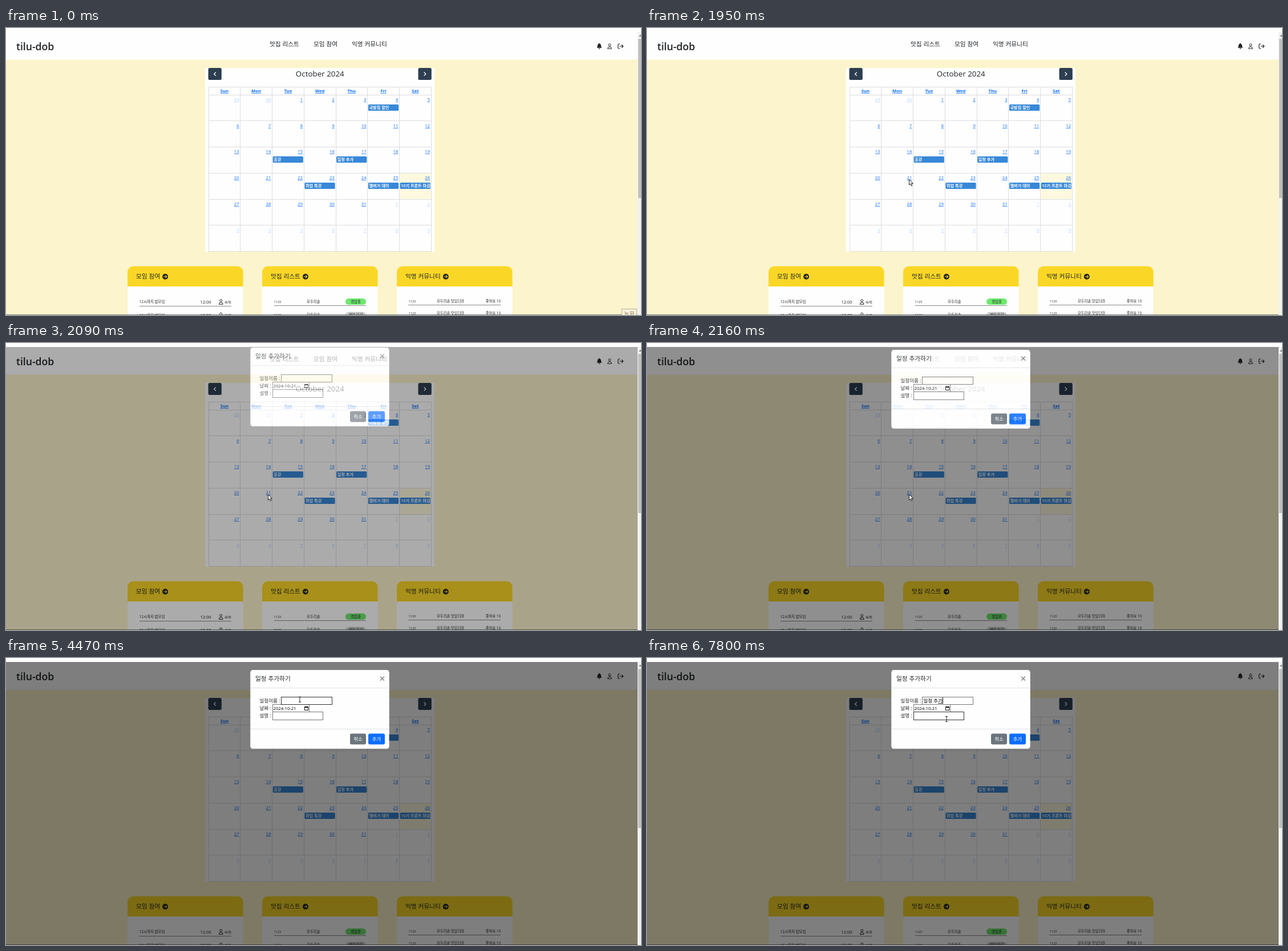
An HTML page with a canvas that plays this animation: 1113 px wide and 503 px high, repeating every 8 s.

```html
<!DOCTYPE html>
<html lang="ko">
<head>
<meta charset="utf-8">
<title>Calendar</title>
<style>
html, body { margin: 0; width: 100%; height: 100%; overflow: hidden; background: #fff; }
canvas { display: block; }
</style>
</head>
<body>
<canvas id="stage" width="1113" height="503"></canvas>
<script>
const W = 1113, H = 503, LOOP = 8000;
const FONT = '"Open Sans", "Noto Sans CJK KR", "Noto Sans CJK JP", sans-serif';
const INK = '#212529', LINK = '#0d6efd', YELLOW = '#fad726';
const stage = document.getElementById('stage').getContext('2d');

function layer(paint) {
  const canvas = document.createElement('canvas');
  canvas.width = W;
  canvas.height = H;
  paint(canvas.getContext('2d'));
  return canvas;
}

function rect(c, x, y, w, h, color, radius = 0) {
  c.fillStyle = color;
  c.beginPath();
  c.roundRect(x, y, w, h, radius);
  c.fill();
}

function stroke(c, path, color, width = 1) {
  c.strokeStyle = color;
  c.lineWidth = width;
  c.stroke(new Path2D(path));
}

// y is the visual middle of the glyphs
function text(c, str, x, y, size, { color = INK, weight = 400, align = 'left', underline = false } = {}) {
  c.font = `${weight} ${size}px ${FONT}`;
  c.fillStyle = color;
  c.textAlign = 'left';
  const w = c.measureText(str).width;
  const left = align === 'center' ? x - w / 2 : align === 'right' ? x - w : x;
  const base = y + size * 0.37;
  c.fillText(str, left, base);
  if (underline) c.fillRect(left, Math.round(base + 1), w, 0.8);
  return left + w;
}

function person(c, x, y) {
  c.strokeStyle = INK;
  c.lineWidth = 1;
  c.beginPath();
  c.arc(x, y - 2.3, 2, 0, Math.PI * 2);
  c.stroke();
  stroke(c, `M${x - 3.5} ${y + 4.3} q0 -3.4 3.5 -3.4 q3.5 0 3.5 3.4 z`, INK);
}

function navbar(c) {
  rect(c, 0, 0, W, 55.5, '#fefefe');
  text(c, 'tilu-dob', 18, 32.5, 17.6, { weight: 600 });
  text(c, '맛집 리스트', 462, 28, 10.7);
  text(c, '모임 참여', 539, 28, 10.7);
  text(c, '익명 커뮤니티', 606, 28, 10.7);
  c.fillStyle = INK;
  c.fill(new Path2D('M1035.5 34.8 q1.3 -1.4 1.3 -4 q0 -2.7 2.5 -3.2 v-1 h1.2 v1 q2.5 .5 2.5 3.2 q0 2.6 1.3 4 z M1038.5 35.5 h3 q-.2 1.4 -1.5 1.4 q-1.3 0 -1.5 -1.4 z'));
  person(c, 1058, 32);
  stroke(c, 'M1076 28 h-2 q-1.2 0 -1.2 1.2 v5.6 q0 1.2 1.2 1.2 h2 M1075.5 32 h6 M1079 29.2 l2.8 2.8 l-2.8 2.8', INK, 1.2);
}

const EVENTS = [[0, 5, '국밥집 할인'], [2, 2, '휴강'], [2, 4, '일정 추가'],
  [3, 3, '취업 특강'], [3, 5, '햄버거 데이'], [3, 6, '10기 프론트 마감']];

function calendar(c) {
  const left = 355, top = 117, cw = 55.75, rh = 45.75;
  const colX = i => Math.round(left - 0.5 + i * cw);
  const rowY = i => Math.round(top - 0.5 + i * rh);
  rect(c, 349, 70, 402, 322, '#fefefe');
  rect(c, 354.5, 70, 23.3, 21, '#2c3e50', 2.5);
  rect(c, 722.5, 70, 23.3, 21, '#2c3e50', 2.5);
  stroke(c, 'M367.8 77.5 l-3.2 3.2 l3.2 3.2 M732.6 77.5 l3.2 3.2 l-3.2 3.2', '#fff', 1.3);
  text(c, 'October 2024', 550.3, 80.5, 13.4, { align: 'center' });

  rect(c, colX(6), rowY(3), cw, rh, 'rgba(255,220,40,.15)');
  for (let i = 0; i <= 7; i++) rect(c, colX(i), 103, 1, 289, '#ddd');
  rect(c, left, 103, 391, 1, '#ddd');
  for (let i = 0; i <= 6; i++) rect(c, left, rowY(i), 391, 1, '#ddd');

  ['Sun', 'Mon', 'Tue', 'Wed', 'Thu', 'Fri', 'Sat'].forEach((d, i) =>
    text(c, d, left + (i + 0.5) * cw, 110, 7.7, { color: LINK, weight: 700, align: 'center', underline: true }));

  for (let i = 0; i < 42; i++) {
    const day = i - 1;
    const inside = day > 0 && day <= 31;
    const shown = day <= 0 ? day + 30 : day > 31 ? day - 31 : day;
    c.globalAlpha = inside ? 1 : 0.3;
    text(c, String(shown), left + (i % 7 + 1) * cw - 2.3, top + Math.floor(i / 7) * rh + 8, 7.5,
      { color: LINK, align: 'right', underline: true });
  }
  c.globalAlpha = 1;

  for (const [row, col, label] of EVENTS) {
    const x = left + col * cw + 1.2, y = rowY(row) + 17;
    rect(c, x, y, 53.2, 11, '#3788d8', 1.5);
    text(c, label, x + 1.5, y + 5.4, 7.2, { color: '#fff', weight: 600 });
  }
}

function card(c, x, title) {
  rect(c, x, 417.6, 202.6, 90, '#fefefe', [10, 10, 0, 0]);
  rect(c, x, 417.6, 202.6, 35.4, YELLOW, [10, 10, 0, 0]);
  const end = text(c, title, x + 15, 435.5, 10.7, { weight: 500 });
  const ix = end + 9;
  c.fillStyle = INK;
  c.beginPath();
  c.arc(ix, 435.7, 5, 0, Math.PI * 2);
  c.fill();
  stroke(c, `M${ix - 2.8} 435.7 h5.4 M${ix + 0.3} 433.3 l2.4 2.4 l-2.4 2.4`, YELLOW, 1.1);
}

function pill(c, y, label, color) {
  rect(c, 595, y - 5.5, 36, 11, color, 5.5);
  text(c, label, 613, y, 6.4, { weight: 500, align: 'center' });
}

function cards(c) {
  card(c, 213, '모임 참여');
  card(c, 449, '맛집 리스트');
  card(c, 685, '익명 커뮤니티');
  for (let i = 0; i < 2; i++) {
    const a = 480 + i * 23.5, b = 479.5 + i * 23.5, d = 478.5 + i * 21;
    text(c, '12시까지 밥모임', 233.5, a, 6.5);
    text(c, '12:00', 340.5, a, 7.5);
    person(c, 376.7, a);
    text(c, '4/6', 383, a, 7.8);
    rect(c, 234, a + 7, 161, 1, '#8a8a8a');

    text(c, '1123', 469.5, b, 5.6);
    text(c, '모두리솥', 527, b, 6.4);
    pill(c, b, i ? '영업 마감' : '영업중', i ? '#d3d3d3' : '#6ee86e');
    rect(c, 470, b + 6.5, 161, 1, '#8a8a8a');

    text(c, '1123', 705.5, d, 5.6);
    text(c, '모두리솥 맛있더라', 755, d, 6.3);
    text(c, '좋아요 10', 867, d, 6.3, { align: 'right' });
    rect(c, 705, d + 6.5, 162, 1, '#8a8a8a');
  }
}

function scrollbar(c) {
  rect(c, 1107, 7, 6, 496, '#f1f1f1');
  rect(c, 1108, 19, 5, 279, '#c1c1c1');
  c.fillStyle = '#8a8a8a';
  c.fill(new Path2D('M1109 15 l3 -3.5 l3 3.5 z'));
}

function field(c, [x, y, w, h], color = '#767676') {
  rect(c, x, y, w, h, color);
  rect(c, x + 1, y + 1, w - 2, h - 2, '#fff');
}

const BOX = [428.5, 21, 243, 138];
const NAME = [482, 68, 90, 14], DATE = [467, 81, 65, 14], NOTE = [467, 94, 89, 15];

function dialog(c) {
  rect(c, ...BOX, '#fefefe', 4.5);
  text(c, '일정 추가하기', 437, 36.5, 10.7);
  stroke(c, 'M656 32.5 l7 7 M663 32.5 l-7 7', '#777', 1.1);
  rect(c, 429, 52, 242, 1, '#dee2e6');
  rect(c, 429, 124, 242, 1, '#dee2e6');
  text(c, '일정이름 :', 444.5, 75, 8.5);
  text(c, '날짜 :', 444.5, 88.3, 8.5);
  text(c, '설명 :', 444.5, 101.3, 8.5);
  [NAME, DATE, NOTE].forEach(f => field(c, f));
  text(c, '2024-10-21', 468.5, 88.2, 7.7, { color: '#000' });
  stroke(c, 'M523.5 86 h6 v5.5 h-6 z', '#111');
  rect(c, 523, 85, 7, 2, '#111');
  rect(c, 603, 132.5, 28, 19, '#6c757d', 3);
  rect(c, 635, 132.5, 29, 19, LINK, 3);
  text(c, '취소', 617, 142, 8.5, { color: '#fff', align: 'center' });
  text(c, '추가', 649.5, 142, 8.5, { color: '#fff', align: 'center' });
}

const page = layer(c => {
  rect(c, 0, 0, W, H, '#fcf4cc');
  navbar(c);
  calendar(c);
  cards(c);
  rect(c, 0, 502, 1107, 1, 'rgba(85,85,80,.75)');
  scrollbar(c);
});
const modal = layer(dialog);

// The shade leaves out the dialog, which fades in over the bright page
function drawModal(c, t) {
  const step = Math.min(Math.floor((t - 2020) / 70), 5);
  const fade = Math.min(0.44 + step * 0.22, 1);
  const lift = Math.round(17 * (1 - step / 5) ** 1.25);
  const [x, y, w, h] = BOX;
  c.save();
  c.beginPath();
  c.rect(0, 7, 1107, 496);
  c.clip();
  c.beginPath();
  c.rect(0, 0, W, H);
  c.roundRect(x, y - lift, w, h, 4.5);
  c.fillStyle = `rgba(0,0,0,${fade / 2})`;
  c.fill('evenodd');
  c.globalAlpha = fade;
  c.drawImage(modal, 0, -lift);
  c.restore();
}

// pointer moves: start, step length, step count, waypoints
const MOVES = [
  [660, 68, 12, [[969, 486], [740, 400], [530, 325], [443, 290], [455, 271]]],
  [1480, 70, 2, [[457, 261], [459.5, 265.5]]],
  [3450, 75, 11, [[470.5, 215], [488, 150], [502, 92], [512, 75]]],
  [4340, 86, 4, [[514, 70], [517, 78]]],
  [7520, 70, 5, [[518, 84], [525, 107]]]
];

function pointerAt(t) {
  const move = MOVES.filter(m => t >= m[0]).pop();
  if (!move) return null;
  const [start, step, count, pts] = move;
  const u = Math.min(Math.floor((t - start) / step) / (count - 1), 1) * (pts.length - 1);
  const i = Math.min(Math.floor(u), pts.length - 2), k = u - i;
  return [0, 1].map(n => pts[i][n] + (pts[i + 1][n] - pts[i][n]) * k);
}

const TYPING = [[5390, 'ㅇ'], [5460, '이'], [5520, '일'], [5720, '일ㅈ'], [5780, '일저'], [5920, '일정'],
  [6050, '일정 '], [6130, '일정 ㅊ'], [6260, '일정 추'], [6400, '일정 추ㄱ'], [6470, '일정 추가']];

function drawTyping(c, t) {
  if (t < 4600) return;
  const str = (TYPING.filter(k => t >= k[0]).pop() || [0, ''])[1];
  const end = text(c, str, 484.5, 74.5, 8.5, { color: '#000' });
  const last = str.slice(-1);
  if (last.trim()) {
    const w = c.measureText(last).width;
    rect(c, end - w, 79, w, 1, '#333');
  }
  const hidden = (t >= 4860 && t < 5390) || (t >= 6990 && t < 7520);
  if (!hidden) rect(c, Math.round(end), 69, 1, 11, '#111');
}

const within = ([x, y], [l, t, w, h]) => x >= l && x <= l + w && y >= t && y <= t + h;

function drawPointer(c, [x, y], beam) {
  c.save();
  c.translate(x, y);
  if (beam) {
    stroke(c, 'M-2 -4.5 h4 M0 -4.5 v9 M-2 4.5 h4', '#222', 1);
  } else {
    const arrow = 'M0 0 v9.6 l2.2 -2 l1.6 3.6 l1.6 -.7 l-1.6 -3.5 h3 z';
    c.fillStyle = '#fff';
    c.fill(new Path2D(arrow));
    stroke(c, arrow, '#111', 0.9);
  }
  c.restore();
}

function drawTip(c) {
  rect(c, 1079, 492, 27, 11, '#b9ab90');
  rect(c, 1080, 493, 25, 10, '#fdf3da');
  text(c, '녹화', 1092.5, 501.5, 10, { color: '#8a7763', align: 'center' });
}

function draw(t) {
  const c = stage;
  c.drawImage(page, 0, 0);
  if (t < 130) {
    c.globalAlpha = t < 70 ? 1 : 0.5;
    drawTip(c);
    c.globalAlpha = 1;
  }
  const pos = pointerAt(t);
  let beam = false;
  if (t >= 2020) {
    drawModal(c, t);
    const hovered = [NAME, NOTE].find(f => within(pos, f));
    if (hovered) field(c, hovered, '#333');
    beam = Boolean(hovered) || t >= 4200;
    drawTyping(c, t);
  }
  if (pos) drawPointer(c, pos, beam);
}

function tick(now) {
  draw(now % LOOP);
  requestAnimationFrame(tick);
}
draw(0);
requestAnimationFrame(tick);
</script>
</body>
</html>
```
